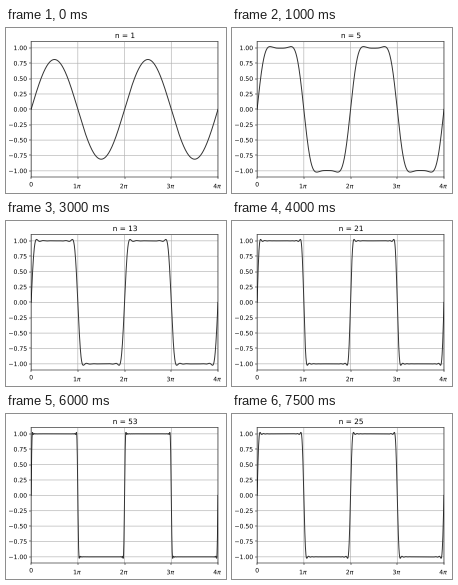
Write a matplotlib script that moves like this. It is 220x165 px and loops after 8 s.

```python
import matplotlib.pyplot as plt
import numpy as np
from matplotlib.animation import FuncAnimation
from matplotlib.patheffects import Normal

plt.rcParams.update({
    "font.family": "DejaVu Sans",
    "font.size": 10,
    "text.hinting": "none",
    "text.hinting_factor": 1,
    "path.snap": False,  # soft lines at sub-pixel positions
})

W, H, DPI = 220, 165, 44
LEFT, RIGHT, TOP, BOTTOM = 25.1, 212, 13.7, 149

# Highest harmonic: climbs with growing steps, then comes back down
steps = [2] * 6 + [4] * 4 + [8, 16]
rise = 1 + np.cumsum([0] + steps)
orders = [int(n) for n in np.concatenate([rise, rise[-2:-5:-1]])]

x = np.linspace(0, 4 * np.pi, 1000)


def square_wave(n):
    """Fourier sum of a square wave, smoothed by Lanczos sigma factors."""
    k = np.arange(1, n + 1, 2)[:, None]
    return 4 / np.pi * np.sum(np.sinc(k / (n + 1)) * np.sin(k * x) / k, axis=0)


fig = plt.figure(figsize=(W / DPI, H / DPI), dpi=DPI, facecolor="white")
ax = fig.add_axes([LEFT / W, 1 - BOTTOM / H, (RIGHT - LEFT) / W, (BOTTOM - TOP) / H])
ax.set_xlim(0, 4 * np.pi)
ax.set_ylim(-1.1, 1.1)
ax.set_xticks(np.arange(5) * np.pi, ["0"] + [rf"{i}$\pi$" for i in range(1, 5)])
ax.set_yticks(np.arange(-1, 1.01, 0.25))
ax.yaxis.set_major_formatter("{x:.2f}")
ax.tick_params(axis="x", pad=4.5)
ax.grid(True, color="#b0b0b0", linewidth=1)
for spine in ax.spines.values():
    spine.set_linewidth(0.9)

curve, = ax.plot([], [], color="0.2", linewidth=1.6)
title = ax.set_title("", fontsize=12)

# Draw text as outlines so it is placed at sub-pixel positions too
for text in [title, *ax.get_xticklabels(), *ax.get_yticklabels()]:
    text.set_path_effects([Normal()])


def update(i):
    n = orders[i]
    curve.set_data(x, square_wave(n))
    title.set_text(f"n = {n}")
    return curve, title


anim = FuncAnimation(fig, update, frames=len(orders), interval=500,
                     repeat=True, repeat_delay=0, blit=False)
plt.show()
```
